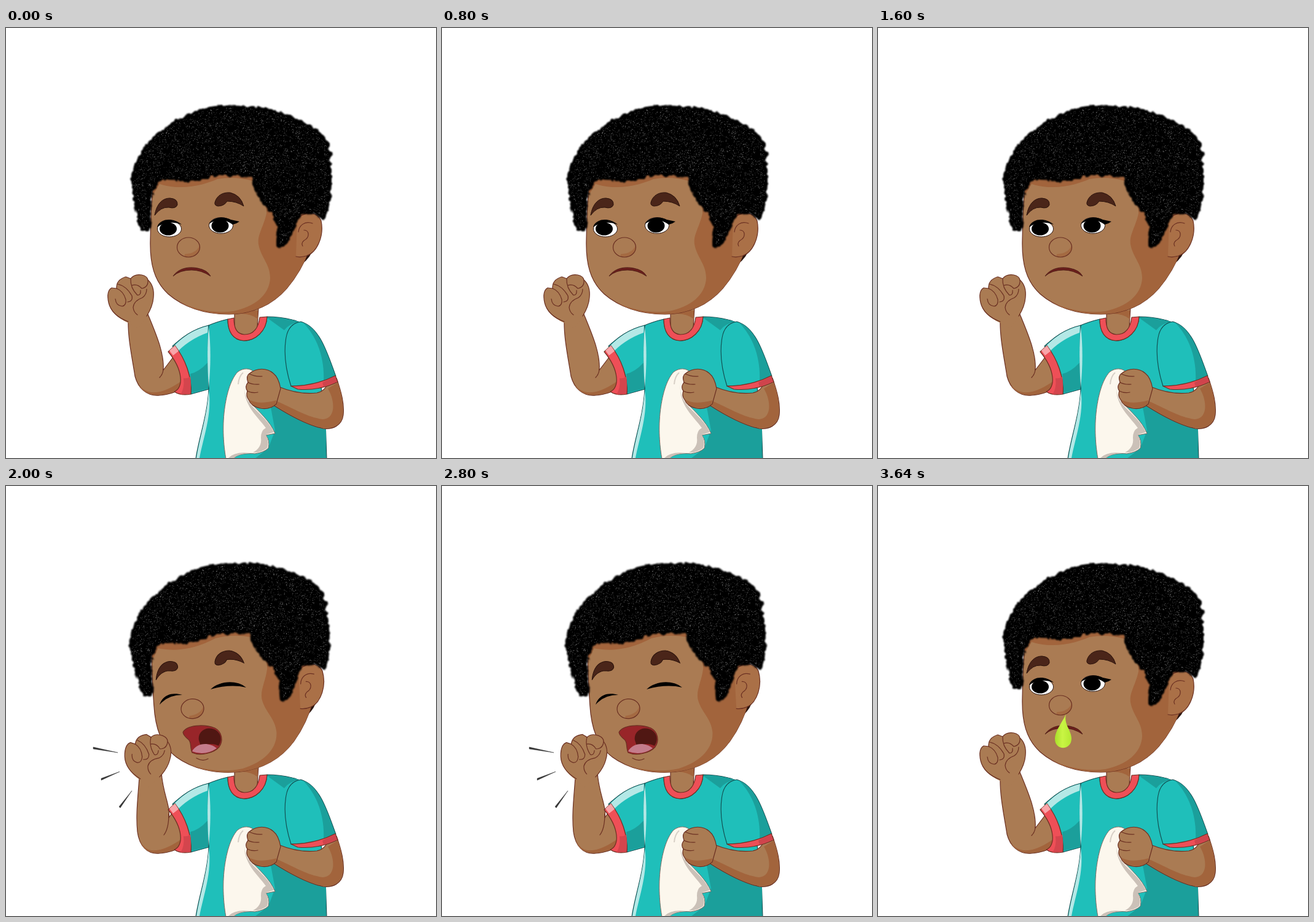
Write an HTML page that moves like this. It is 700x700 px and loops after 4120 ms.

```html
<!DOCTYPE html>
<html lang="en">
<head>
<meta charset="utf-8">
<title>Coughing boy</title>
<style>
  html, body { margin: 0; width: 100%; height: 100%; overflow: hidden; background: #fff; }
  svg { display: block; width: 100vw; height: 100vh; }
  .skin { fill: #aa7b53; }
  .shade { fill: #a2643c; }
  .line { stroke: #6b3022; stroke-width: 1.2; stroke-linejoin: round; stroke-linecap: round; }
  .bare { fill: none; }
  .teal { fill: #1fbfba; }
  .dim { fill: #1b9f9b; }
  .glow { fill: #b4e8e6; }
  .red { fill: #ee4f57; }
  .seam { stroke: #124a4c; stroke-width: 1.1; stroke-linejoin: round; }
  .brow { fill: #4a2519; stroke: #2a120b; }
  .cough .rest, svg:not(.cough) .puff { display: none; }
</style>
</head>
<body>
<svg id="stage" viewBox="0 0 700 700">
  <defs>
    <path id="hairShape" d="M222 327 C216 315 214 295 211 275 C207 260 206 245 209 237 C213 221 221 205 230 195 C238 182 249 172 264 162 C276 154 288 149 301 143 C316 135 332 131 350 130 C378 128 397 131 420 134 C440 138 460 146 480 154 C500 162 518 178 523 195 C527 212 526 235 526 255 C525 275 522 295 516 309 C507 299 490 296 477 303 C468 314 464 334 456 346 C452 353 447 354 444 350 C444 338 448 330 442 314 C437 301 429 291 420 281 C411 271 410 256 400 239 C380 235 362 237 346 235 C331 241 313 246 293 246 C278 246 260 241 246 247 C235 260 232 287 232 302 C232 315 231 324 229 328Z"/>
    <path id="faceShape" d="M242 242 C236 276 236 305 235 345 C234 383 241 412 264 433 C288 454 323 466 363 466 C405 465 435 449 457 424 C474 404 486 382 494 360 L498 290 L400 225Z"/>
    <clipPath id="inHair"><use href="#hairShape"/></clipPath>
    <clipPath id="inFace"><use href="#faceShape"/></clipPath>
    <clipPath id="inNose"><ellipse cx="297" cy="357" rx="18.5" ry="16"/></clipPath>
    <filter id="fluffy" x="-5%" y="-5%" width="110%" height="110%">
      <feTurbulence type="fractalNoise" baseFrequency=".1" numOctaves="2" seed="4"/>
      <feDisplacementMap in="SourceGraphic" scale="10" xChannelSelector="R" yChannelSelector="G"/>
      <feGaussianBlur stdDeviation=".8"/>
    </filter>
    <linearGradient id="slime"><stop stop-color="#a9df2b"/><stop offset=".45" stop-color="#c9f544"/><stop offset="1" stop-color="#b4e832"/></linearGradient>
  </defs>

  <!-- neck and shirt -->
  <path class="skin line" d="M372 455 V494 Q388 512 409 488 L411 455Z"/>
  <path class="shade" d="M373 460 H410 V474 Q397 463 373 466Z"/>
  <path class="teal seam" d="M361 474 Q344 478 330 484 C326 530 329 555 330 588 C328 630 314 667 309 701 H522 L520 640 L505 520 Q490 479 466 475 Q446 470 425 470 C424 494 404 509 388 509 C369 506 361 494 361 474Z"/>
  <path class="dim" d="M424 471 L453 492 Q461 481 478 478 Q450 471 424 471Z"/>
  <path class="dim" d="M430 612 L521 645 V701 H405 L427 684 L438 655Z"/>
  <path class="glow" d="M330 590 C328 630 315 667 310 700 H315 C321 668 336 627 330 590Z"/>
  <path class="teal seam" d="M330 484 C304 490 286 504 271 518 C291 540 303 567 301 596 L330 588 C329 552 328 525 330 484Z"/>
  <path class="glow" d="M329 485 C304 491 287 504 273 518 L281 525 C295 511 312 502 328 496Z"/>
  <path class="dim" d="M300 563 Q314 560 328 545 L329 587 L302 594Z"/>
  <path class="glow" d="M330 486 C334 520 333 555 330 586 C328 552 327 520 330 486Z"/>

  <!-- collar -->
  <path class="red line" d="M361 474 C361 494 369 508 387 509 C406 509 424 494 425 470 L413 471 C411 488 403 499 388 499 C375 498 371 488 371 472Z"/>

  <!-- raised arm -->
  <g class="rest">
    <path class="skin line" d="M199 474 C198 505 206 540 210 567 C215 586 229 600 250 598 C266 597 278 592 289 587 L282 547 L272 536 L256 557 C258 530 245 500 231 466Z"/>
    <path class="shade" d="M214 579 C222 592 234 599 250 597 C266 596 278 591 289 586 L288 573 C270 586 249 597 232 592 Q222 589 214 579Z"/>
    <path class="bare line" d="M256 555 Q256 563 250 569"/>
  </g>
  <g class="puff">
    <path class="skin line" d="M217 474 C215 505 211 535 214 563 C217 586 230 600 250 598 C266 597 278 592 289 587 L283 545 L270 533 L265 540 C268 520 255 500 253 466Z"/>
    <path class="shade" d="M217 575 C222 592 234 599 250 597 C266 596 278 591 289 586 L288 573 C270 586 249 597 232 592 Q222 587 217 575Z"/>
    <path class="bare line" d="M265 534 Q265 558 257 568"/>
  </g>
  <path class="red line" d="M264 527 L275 517 C292 539 303 568 301 596 Q284 599 274 592 C289 586 289 557 264 527Z"/>
  <path d="M266 525 L275 517 L281 526 L272 533Z" fill="#f8a5a9"/>
  <path d="M289 570 Q296 571 300 567 Q302 581 300 595 L284 597 Q291 586 289 570Z" fill="#d4454d"/>

  <!-- lowered arm -->
  <path class="skin line" d="M538 570 C546 593 551 612 549 630 C547 647 532 654 516 652 C488 646 459 629 437 615 L444 584 C466 593 488 596 506 594 Q518 592 523 580Z"/>
  <path class="shade" d="M540 577 C546 593 550 612 548 630 C546 647 531 653 516 651 C488 645 459 628 438 614 L440 607 C467 619 491 634 516 637 C537 636 536 607 524 587Z"/>
  <path class="teal seam" d="M480 478 C511 487 523 529 537 567 Q505 583 464 583 C455 555 452 527 456 504 Q460 481 480 478Z"/>
  <path class="dim" d="M484 480 C509 488 523 529 536 566 L517 575 C519 539 507 503 484 480Z"/>
  <path class="red line" d="M464 583 Q505 582 536 566 L540 576 Q510 591 475 588Z"/>
  <path d="M515 577 L536 567 L539 576 L517 584Z" fill="#cf444c"/>

  <!-- handkerchief and hand -->
  <path d="M405 561 C398 553 386 553 377 560 C365 573 358 599 355 627 C352 657 355 685 358 701 H370 C377 693 394 692 405 693 Q420 691 427 684 Q430 671 423 663 L438 660 C430 640 411 624 399 611 C388 596 393 576 405 561Z" fill="#fcf7ed" stroke="#796c64" stroke-width="1"/>
  <path d="M391 566 C382 596 394 610 411 626 Q430 644 436 658 L423 662 Q429 674 425 684 Q414 692 402 691 Q417 683 415 667 Q415 655 423 651 C409 631 378 609 391 566Z M362 700 Q373 689 397 692 Q379 693 371 700Z" fill="#cbc1b8"/>
  <path d="M386 561 Q379 567 378 580" fill="none" stroke="#d8d0c7" stroke-width="2"/>
  <path class="skin line" d="M397 562 C408 553 425 553 435 562 Q444 569 447 587 L440 612 Q429 622 414 619 Q399 616 395 605 Q390 599 393 591 Q388 584 394 577 Q390 566 397 562Z"/>
  <path class="shade" d="M396 605 Q411 614 440 606 L439 612 Q429 621 414 618 Q399 615 396 605Z"/>
  <path class="bare line" d="M396 563 Q406 568 417 567 M394 577 Q402 581 412 580 M393 591 Q401 595 410 593"/>

  <!-- head -->
  <g id="head">
    <path d="M501 357 Q496 374 482 384 L487 366Z" fill="#2b1710"/>
    <use href="#faceShape" class="skin line"/>
    <g clip-path="url(#inFace)">
      <path class="shade" d="M400 225 C414 260 425 284 424 302 C419 325 409 336 411 352 C415 374 430 384 430 407 C429 435 404 454 370 461 C338 465 306 459 272 441 L310 480 H510 V225Z"/>
      <path class="shade" d="M238 274 L250 254 C280 263 311 260 344 246 Q372 241 402 249 L400 230 H240Z"/>
    </g>
    <path d="M474 312 C483 300 506 297 513 314 C518 338 507 365 489 371 Q479 374 472 372Z" fill="#aa7047"/>
    <path class="bare line" d="M478 307 C490 299 507 299 513 314 C518 338 507 365 489 371 Q479 374 472 372 M499 318 C486 313 477 322 476 332 M485 329 C494 329 495 341 485 346 Q480 350 483 355"/>
    <path class="brow" d="M242 305 C245 287 254 277 267 277 Q280 278 279 288 Q276 295 265 292 Q252 291 242 305Z"/>
    <path class="brow" d="M340 284 C343 272 354 267 365 268 Q382 272 387 290 Q375 282 360 282 Q355 290 345 290 Q339 289 340 284Z"/>
    <g clip-path="url(#inNose)">
      <path class="shade" d="M317 346 Q315 367 291 368 L290 376 H320Z" opacity=".75"/>
    </g>
    <ellipse class="bare line" cx="297" cy="357" rx="18.5" ry="16"/>
    <g class="rest">
      <g fill="#fff" stroke="#2a1510">
        <ellipse cx="266" cy="327" rx="19.5" ry="13"/>
        <ellipse cx="350" cy="321.500" rx="19.5" ry="13"/>
      </g>
      <ellipse cx="264" cy="327" rx="14" ry="10.500"/>
      <ellipse cx="348.500" cy="322" rx="14" ry="11"/>
      <path d="M246 324 C250 310 272 308 286 320 Q265 312 246 324Z"/>
      <path d="M330 319 C339 306 356 307 366 312 L380 315 Q375 319 369 320 Q350 306 330 319Z"/>
      <path d="M272 404 C281 391 297 388 312 391 Q328 394 333 404 Q318 394 302 394 Q283 394 272 404Z" fill="#6b1f1c" stroke="#431511" stroke-width=".8"/>
    </g>
    <use href="#hairShape" filter="url(#fluffy)" fill="#060606" stroke="#060606" stroke-width="8" stroke-linejoin="round"/>
    <g clip-path="url(#inHair)" fill="none">
      <path id="dull" stroke="#3a3a3a"/>
      <path id="bright" stroke="#858585"/>
      <path id="curls" stroke="#000" stroke-width="10" stroke-linecap="round"/>
    </g>
  </g>

  <!-- coughing face -->
  <g class="puff">
    <path d="M250 356 C255 340 270 335 287 340 Q264 340 250 356Z"/>
    <path d="M333 331 C346 318 374 314 391 328 Q365 322 333 331Z"/>
    <path class="line" d="M288 401 C294 389 322 387 340 394 C352 400 354 415 347 425 C338 435 316 440 303 434 C299 426 303 416 295 411 Q289 406 288 401Z" fill="#982529"/>
    <path d="M314 414 C312 400 325 391 339 396 C350 401 353 413 346 423 Q335 417 317 423Z" fill="#501713"/>
    <path d="M303 432 C309 420 328 415 343 427 Q324 440 303 432Z" fill="#c47c8b"/>
    <path class="bare line" d="M310 443 Q320 449 329 444"/>
    <path d="M142 425 L182 434 L142 428Z M155 476 L185 465 L155 479Z M184 522 L205 496 L186 524Z" fill="#353535" stroke="#353535" stroke-width=".5"/>
  </g>

  <!-- fist -->
  <g id="fist">
    <path class="skin" d="M199 480 Q172 468 167 447 Q163 428 172 423 L180 424 Q179 410 195 405 L203 408 Q209 400 221 402 Q230 404 231 410 Q242 420 240 439 Q239 453 229 470 L215 489Z"/>
    <path class="bare line" d="M199 478 Q172 468 167 447 Q163 428 172 423 L180 424 Q179 410 195 405 L203 408 Q209 400 221 402 Q230 404 231 410 Q242 420 240 439 Q239 453 229 469"/>
    <path class="bare line" d="M180 424 Q191 428 195 442 Q196 452 189 453 Q179 452 178 441 M182 417 Q196 420 205 436 Q207 445 198 446 M203 408 Q202 423 214 435 Q220 435 219 427 M205 419 Q214 416 221 424 Q232 422 231 410 M222 439 Q208 444 207 455 Q208 463 214 467 M222 439 Q229 434 229 425"/>
  </g>

  <path id="drop" d="M306 371 C302 382 288 398 288 412 C288 431 315 431 315 411 C315 398 302 388 306 371Z" fill="url(#slime)"/>
</svg>
<script>
const $ = id => document.getElementById(id);

let seed = 11;
const rand = () => (seed = seed * 16807 % 2147483647) / 2147483647;
const scatter = (count, size) => {
  let d = '';
  while (count--) d += `M${(200 + rand() * 332).toFixed(1)} ${(122 + rand() * 235).toFixed(1)}h${size}`;
  return d;
};
$('dull').setAttribute('d', scatter(6500, 1));
$('bright').setAttribute('d', scatter(1500, 1));
$('curls').setAttribute('d', scatter(36, .1));

const LOOP = 4120, POSE = 400, DRIP = 3200, STEP = 40, STEPS = 11;

function draw() {
  const t = performance.now() % LOOP;
  const cough = t < DRIP && Math.floor(t / POSE) % 2 === 1;
  $('stage').classList.toggle('cough', cough);
  $('head').setAttribute('transform', cough ? 'rotate(-5 365 285)' : '');
  $('fist').setAttribute('transform', cough ? 'rotate(11 215 580)' : '');
  const grow = Math.max(0, Math.min(1, Math.floor((t - DRIP) / STEP) / STEPS));
  $('drop').setAttribute('transform', `translate(306 371) scale(${grow}) translate(-306 -371)`);
  requestAnimationFrame(draw);
}
draw();
</script>
</body>
</html>
```
